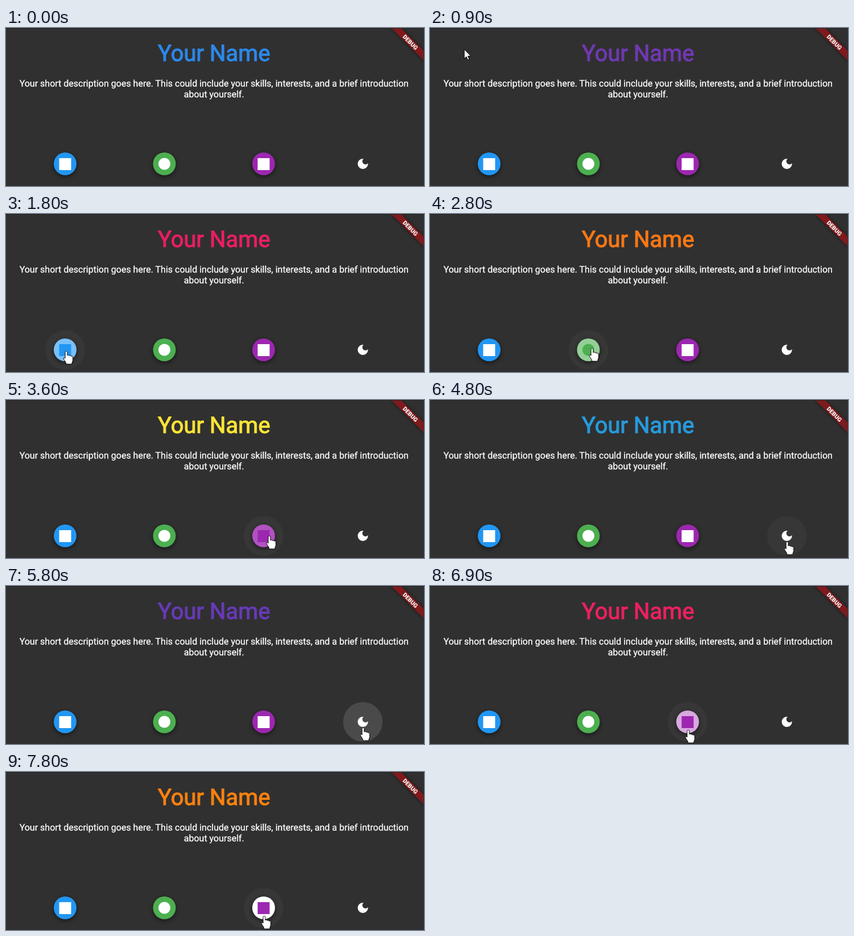
Recreate the animation shown at these times as an HTML page. Size 735 px wide and 278 px high, loop 8 s.

```html
<!DOCTYPE html>
<html lang="en">
<head>
<meta charset="utf-8">
<title>Profile page</title>
<style>
  html, body { margin: 0; width: 100%; height: 100%; overflow: hidden; background: #303030; }
  svg { display: block; width: 735px; height: 278px; font-family: Roboto, sans-serif; }
  text { text-anchor: middle; text-rendering: geometricPrecision; }
  .copy { font-size: 16px; fill: #fff; stroke: #fff; stroke-width: .3px; }
  #name { font-size: 40px; stroke-width: 1.1px; }
  .debug { font-size: 10.2px; font-weight: 900; fill: #fff; }
  .hand, .arrow { fill: #fff; stroke: #000; stroke-linejoin: round; }
</style>
</head>
<body>
<svg viewBox="0 0 735 278">
  <defs>
    <filter id="soft" x="-50%" y="-50%" width="200%" height="200%"><feGaussianBlur stdDeviation="3.4"/></filter>
  </defs>
  <text id="name" x="365.8" y="58.2">Your Name</text>
  <text class="copy" x="365.8" y="103">Your short description goes here. This could include your skills, interests, and a brief introduction</text>
  <text class="copy" x="365.8" y="122">about yourself.</text>

  <g id="buttons"></g>

  <g transform="translate(735 1) rotate(45)">
    <rect x="-40" y="28" width="80" height="12" opacity=".5" filter="url(#soft)"/>
    <rect x="-42" y="28" width="84" height="12" fill="#7f1a1d"/>
    <text class="debug" y="37.6">DEBUG</text>
  </g>
  <rect width="735" height="1" fill="#222"/>
  <rect x="734" width="1" height="278" fill="#2b2d3c"/>

  <g id="cursor">
    <path class="arrow" d="M0 0V16.5L3.8 13 6.3 18.8 8.9 17.7 6.4 12H11.6Z"/>
    <path class="hand" transform="scale(.96)" d="M-2 2.2C-2 -.2 2 -.2 2 2.2V8.2C2.6 6.7 5.2 6.9 5.5 8.8C6.2 7.6 8.5 7.9 8.8 9.8C9.7 8.7 12 9.3 12 11.4V16.5C12 19 10.4 20 10.2 24H-.2C-.4 20.6 -2.4 18.8 -4.9 14.6C-6 12.4 -3.6 11.5 -2 13.6Z"/>
  </g>
</svg>
<script>
const LOOP = 8000, STEP = 100, ENTER = 600;
const $ = id => document.getElementById(id);

const ramp = (t, from, length) => Math.min(1, Math.max(0, (t - from) / length));
const smooth = k => k * k * (3 - 2 * k);
const lerp = (a, b, k) => a + (b - a) * k;
const mix = (a, b, k) => `rgb(${a.map((v, i) => Math.round(lerp(v, b[i], k)))})`;

const WHITE = [255, 255, 255], BLUE = [33, 150, 243], GREEN = [76, 175, 80];
const hues = [BLUE, [103, 58, 183], [233, 30, 99], [244, 67, 54], [255, 152, 0], [255, 235, 59], GREEN];

// Title colour cycle: time and position in the hues, with stalls in between
const pace = [[0, .15], [1800, 2], [4800, 6.86], [5800, 8], [LOOP, 11]];
const stalls = [[1200, 1500], [5100, 5800], [6600, 7200]];

const buttons = [
  { rgb: BLUE, mark: 'square' },
  { rgb: GREEN, mark: 'circle' },
  { rgb: [156, 39, 176], mark: 'square' },
  { mark: 'moon' }
];

// Where the pointer rests, and on which button
const visits = [
  { button: 0, x: 106, y: 241, arrive: 1700, leave: 2300 },
  { button: 1, x: 285, y: 236, arrive: 2700, leave: 3100 },
  { button: 2, x: 463, y: 239, arrive: 3600, leave: 4000 },
  { button: 3, x: 628, y: 249, arrive: 4700, leave: 5800 },
  { button: 2, x: 454, y: 253, arrive: 6700, leave: LOOP }
];
const press = visits[3];

function add(parent, tag, attrs) {
  const el = document.createElementNS('http://www.w3.org/2000/svg', tag);
  for (const k in attrs) el.setAttribute(k, attrs[k]);
  return parent.appendChild(el);
}

buttons.forEach((b, i) => {
  const g = add($('buttons'), 'g', { transform: `translate(${104 + 174.5 * i} 239)` });
  b.halo = add(g, 'circle', { r: 34.8, fill: '#fff' });
  if (b.mark === 'moon') {
    b.splash = add(g, 'circle', { fill: '#fff' });
    add(g, 'path', { transform: 'translate(-12 -12)', fill: '#fff',
      d: 'M12 3c-4.97 0-9 4.03-9 9s4.03 9 9 9 9-4.03 9-9c0-.46-.04-.92-.1-1.36-.98 1.37-2.58 2.26-4.4 2.26-2.98 0-5.4-2.42-5.4-5.4 0-1.81.89-3.42 2.26-4.4-.44-.06-.9-.1-1.36-.1z' });
    return;
  }
  add(g, 'circle', { cy: 2.5, r: 21.5, opacity: .38, filter: 'url(#soft)' });
  b.disc = add(g, 'circle', { r: 20 });
  b.icon = b.mark === 'circle'
    ? add(g, 'circle', { r: 10.5 })
    : add(g, 'rect', { x: -10.5, y: -10, width: 21, height: 21 });
});

function nameColor(t) {
  const stall = stalls.find(([a, b]) => t >= a && t < b);
  if (stall) t = stall[0];
  const i = pace.findIndex(([end]) => end > t);
  const [a, u] = pace[i - 1], [b, v] = pace[i];
  const phase = lerp(u, v, (t - a) / (b - a)), hue = Math.floor(phase);
  return mix(hues[hue % hues.length], hues[(hue + 1) % hues.length], phase % 1);
}

// Rises as the pointer comes in and falls once it has gone
const presence = (v, t, rise) => ramp(t, v.arrive - 100, rise) * (1 - ramp(t, v.leave + 100, 300));
const hovers = (v, t) => t >= v.arrive - 100 && t < v.leave + 100;

function drawButton(b, i, t) {
  const mine = visits.filter(v => v.button === i);
  const peak = rise => Math.max(...mine.map(v => presence(v, t, rise)));
  b.halo.setAttribute('opacity', .034 * peak(100));
  if (!b.disc) return;
  const hot = mine.some(v => hovers(v, t));
  b.disc.setAttribute('fill', mix(b.rgb, WHITE, peak(500)));
  b.icon.setAttribute('fill', hot ? `rgb(${b.rgb})` : '#fff');
}

function drawSplash(t) {
  const { splash } = buttons[press.button];
  splash.setAttribute('r', 34.8 * ramp(t, press.arrive + 100, 600));
  splash.setAttribute('opacity', .093 * (1 - ramp(t, press.leave, 500)));
}

function drawCursor(t) {
  let x = 50, y = -8, depart = ENTER;
  for (const v of visits) {
    const k = smooth(ramp(t, depart, v.arrive - depart));
    x = lerp(x, v.x, k);
    y = lerp(y, v.y, k);
    depart = v.leave;
  }
  const [arrow, hand] = $('cursor').children;
  const pointing = visits.some(v => hovers(v, t));
  $('cursor').setAttribute('transform', `translate(${x} ${y})`);
  $('cursor').style.display = t < ENTER ? 'none' : '';
  arrow.style.display = pointing ? 'none' : '';
  hand.style.display = pointing ? '' : 'none';
}

function draw(time) {
  const t = Math.floor(time % LOOP / STEP) * STEP;
  const color = nameColor(t);
  $('name').setAttribute('fill', color);
  $('name').setAttribute('stroke', color);
  buttons.forEach((b, i) => drawButton(b, i, t));
  drawSplash(t);
  drawCursor(t);
}

let start;
function frame(now) {
  start ??= now;
  draw(now - start);
  requestAnimationFrame(frame);
}
draw(0);
requestAnimationFrame(frame);
</script>
</body>
</html>
```
